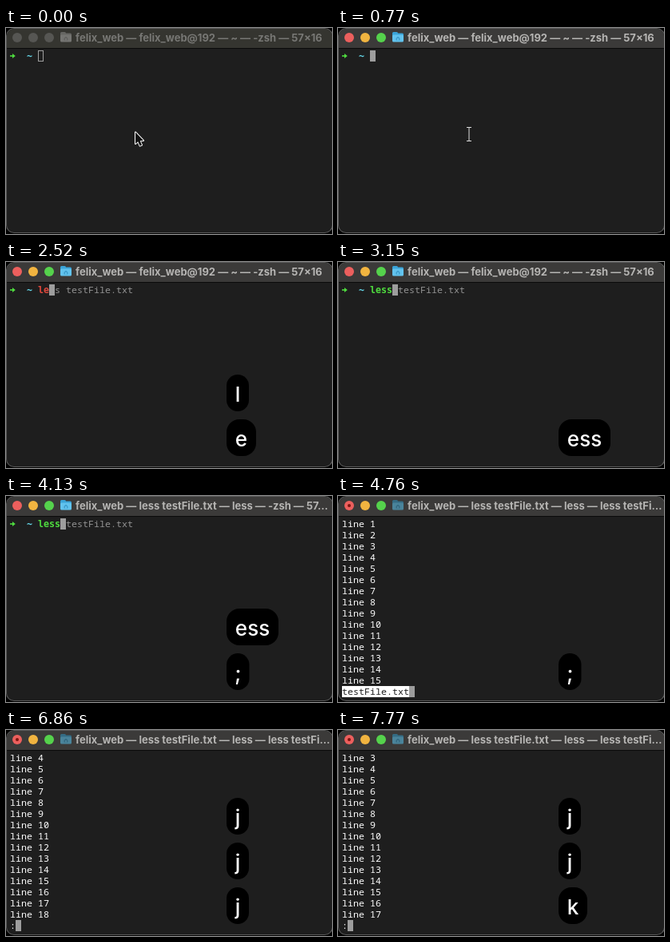
Write an HTML page with a canvas that moves like this. It is 408 px wide and 258 px high and loops after 8 s.

```html
<!DOCTYPE html>
<html lang="en">
<head>
<meta charset="utf-8">
<title>Terminal: paging a file with less</title>
<style>
  html, body { margin: 0; width: 100%; height: 100%; overflow: hidden; background: #000; }
  canvas { display: block; }
</style>
</head>
<body>
<canvas id="stage" width="408" height="258"></canvas>
<script>
const LOOP = 8000, KEY_LIFE = 1820;
const CELL_W = 7, CELL_H = 14, LEFT = 5, TOP = 28;
const MONO = '500 11.667px "Noto Sans Mono", monospace';
const MONO_BOLD = '700 11.63px "DejaVu Sans Mono", monospace';
const SANS = 'Inter, sans-serif';
const GREEN = '#4fdc3f', RED = '#e0483c', GREY = '#939393', BODY = '#1e1e1e';
const c = document.getElementById('stage').getContext('2d');

const USER = 'felix_web';
const FILE = 'testFile.txt';

// Each list is in time order; the last entry that has begun applies.
const titles = [
  [0, `${USER} — ${USER}@192 — ~ — -zsh — 57×16`],
  [4130, `${USER} — less ${FILE} — less — -zsh — 57…`],
  [4270, `${USER} — less ${FILE} — less — less testFi…`],
];
const typed = [[0, 0, GREEN], [1330, 1, GREEN], [2450, 2, RED], [2730, 3, RED], [2940, 4, GREEN]];
const firstLines = [[4200, 1], [5880, 2], [6440, 3], [6860, 4], [7770, 3]];

// Key bubbles: a list of [time, label, width] for each
const bubbles = [
  [[1330, 'l', 28]],
  [[2450, 'e', 37], [2730, 'es', 51], [2940, 'ess', 65]],
  [[4130, ';', 28.5]],
  [[5880, 'j', 28]],
  [[6440, 'j', 28]],
  [[6860, 'j', 28]],
  [[7770, 'k', 36]],
];

const latest = (list, t) => list.filter(e => e[0] <= t).pop();

function rect(x, y, w, h, color) {
  c.fillStyle = color;
  c.fillRect(x, y, w, h);
}

function round(x, y, w, h, r, color) {
  c.fillStyle = color;
  c.beginPath();
  c.roundRect(x, y, w, h, r);
  c.fill();
}

function disc(x, y, r, color) {
  c.fillStyle = color;
  c.beginPath();
  c.arc(x, y, r, 0, 7);
  c.fill();
}

function text(s, x, y, color, font, align = 'left') {
  c.font = font;
  c.textAlign = align;
  c.fillStyle = color;
  c.fillText(s, x, y);
}

const cellText = (s, col, row, color, font = MONO) =>
  text(s, LEFT + col * CELL_W, TOP + 11 + row * CELL_H, color, font);

const cellBlock = (col, row, cols, color) =>
  rect(LEFT + col * CELL_W, TOP + row * CELL_H, cols * CELL_W, CELL_H, color);

function shape(points, fill, stroke, width) {
  c.beginPath();
  points.forEach(([x, y]) => c.lineTo(x, y));
  c.closePath();
  if (stroke) {
    c.strokeStyle = stroke;
    c.lineWidth = width;
    c.lineJoin = 'round';
    c.stroke();
  }
  c.fillStyle = fill;
  c.fill();
}

function folder(back, front, mark) {
  round(68, 5, 7, 5, 1.5, back);
  round(68, 6.5, 14, 5, 1.5, back);
  round(68, 8.5, 14, 9, 1.5, front);
  shape([[75, 10.5], [77.5, 12.7], [77.5, 15.5], [72.5, 15.5], [72.5, 12.7]], mark);
  rect(74, 13, 2, 2.5, front);
}

function drawWindow(t) {
  const active = t >= 210;
  rect(0, 0, 408, 258, '#000');
  // The right border lies just outside the stage.
  round(0, 0, 409, 257, 10, '#5a5a5a');
  round(1, 1, 407, 255, 9, BODY);
  round(1, 1, 407, 24, [9, 9, 0, 0], active ? '#3b3a39' : '#353530');
  rect(1, 25, 407, 1, '#0a0a0a');

  const lights = active ? ['#ec5f5d', '#f1b440', '#55d24c'] : ['#565653', '#565653', '#565653'];
  lights.forEach((color, i) => disc(14 + 20 * i, 12, 6, color));
  if (t >= 4270) disc(14, 12, 2, '#7c1511');

  if (!active) folder('#666663', '#757572', '#626260');
  else if (t >= 770 && t < 4270) folder('#3ba4d8', '#62c3ee', '#3f9fce');
  else folder('#356c84', '#4a849b', '#356a82');

  text(latest(titles, t)[1], 87, 16.5, active ? '#b6b5b3' : '#777774', `700 13px ${SANS}`);
}

function drawShell(t) {
  const [, count, color] = latest(typed, t);
  const command = 'less ' + FILE;
  rect(5, 34.2, 4, 1.6, GREEN);
  shape([[8, 32], [11.8, 35], [8, 38]], GREEN);
  cellText('~', 3, 0, '#63d6e8', MONO_BOLD);
  if (count) {
    cellText(command.slice(0, count), 5, 0, color, MONO_BOLD);
    cellText(command.slice(count), 5 + count, 0, GREY);
  }
  if (t < 210) {
    c.strokeStyle = '#a0a0a0';
    c.lineWidth = 1;
    c.strokeRect(40.5, 28.5, 6, 13);
  } else {
    cellBlock(5 + count, 0, 1, '#9d9d9d');
  }
}

function drawPager(t) {
  const first = latest(firstLines, t)[1];
  for (let row = 0; row < 15; row++) cellText('line ' + (first + row), 0, row, '#fff');
  const fresh = t < 5880;
  if (fresh) cellBlock(0, 15, FILE.length, '#fff');
  cellText(fresh ? FILE : ':', 0, 15, fresh ? BODY : '#fff');
  cellBlock(fresh ? FILE.length : 1, 15, 1, '#9d9d9d');
}

function drawPointer(t) {
  if (t < 280) {
    shape([[162, 130.5], [162, 145], [165.2, 142.2], [167.6, 147.7], [170, 146.6],
      [167.7, 141.3], [172, 141]], '#111', '#fff', 2);
  } else if (t < 840) {
    rect(163.5, 125, 1, 16, '#ddd');
    rect(161, 124, 6, 1, '#ddd');
    rect(161, 141, 6, 1, '#ddd');
  }
}

function drawBubbles(t) {
  const alive = bubbles.filter(b => t >= b[0][0] && t < b[b.length - 1][0] + KEY_LIFE);
  alive.reverse().forEach((b, i) => {
    const [, label, w] = latest(b, t);
    const y = 197 - 56 * i;
    round(276, y, w, 46, Math.min(w / 2, 16), '#000');
    text(label, 276 + w / 2, y + 33.5, '#fff', `500 26px ${SANS}`, 'center');
  });
}

function frame(now) {
  const t = now % LOOP;
  drawWindow(t);
  (t < 4200 ? drawShell : drawPager)(t);
  drawPointer(t);
  drawBubbles(t);
  requestAnimationFrame(frame);
}
requestAnimationFrame(frame);
</script>
</body>
</html>
```
